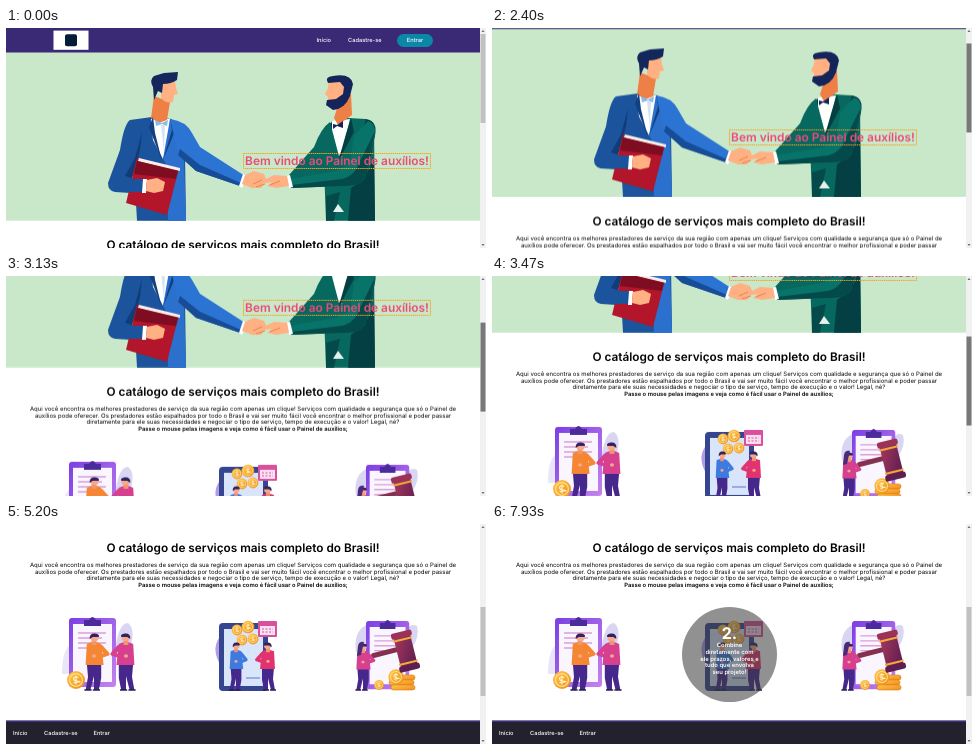
An HTML page for the animation above (8 s loop, 480x220 px).

```html
<!DOCTYPE html>
<html lang="pt-BR">
<head>
<meta charset="utf-8">
<title>Catálogo de serviços</title>
<style>
html, body { margin: 0; width: 100%; height: 100%; overflow: hidden; background: #fff; }
svg { display: block; width: 480px; height: 220px; }
text { font-family: Inter, "Open Sans", sans-serif; font-weight: 500; text-rendering: geometricPrecision; }
.mid text, text.mid { text-anchor: middle; }
.nav { font-size: 5.7px; fill: #fff; }
.h1 { font-size: 11.8px; font-weight: 600; }
.body text { font-size: 6px; font-weight: 400; }
.body .strong { font-size: 5.85px; font-weight: 600; }
.welcome { font-size: 11.9px; font-weight: 600; fill: #ee4a76; }
.tip { fill: #fff; font-size: 5.9px; opacity: 0; }
.tip text { font-weight: 600; }
.tip .num { font-size: 16px; font-weight: 700; }
.tip circle { fill: #3c3c3c; fill-opacity: .56; }

#page { animation: page 8s infinite; }
#thumb { animation: thumb 8s infinite, grab 8s step-end infinite; }
#tip1 { animation: tip1 8s linear infinite; }
#tip2 { animation: tip2 8s linear infinite; }

@keyframes page {
  0% { transform: translateY(0); }
  25.6% { transform: translateY(0); animation-timing-function: cubic-bezier(.3, 0, .7, .7); }
  35% { transform: translateY(-67.3px); animation-timing-function: linear; }
  43.375% { transform: translateY(-136px); animation-timing-function: cubic-bezier(.3, .3, .7, 1); }
  51.9%, 100% { transform: translateY(-193px); }
}
@keyframes thumb {
  0% { transform: translateY(0); }
  25.6% { transform: translateY(0); animation-timing-function: cubic-bezier(.3, 0, .7, .7); }
  35% { transform: translateY(27px); animation-timing-function: linear; }
  43.375% { transform: translateY(54.5px); animation-timing-function: cubic-bezier(.3, .3, .7, 1); }
  51.9%, 100% { transform: translateY(77px); }
}
@keyframes grab {
  0% { fill: #c1c1c1; }
  18.8% { fill: #a8a8a8; }
  24% { fill: #787878; }
  55% { fill: #a8a8a8; }
  58%, 100% { fill: #c1c1c1; }
}
@keyframes tip1 {
  0%, 74% { opacity: 0; }
  80%, 90.5% { opacity: 1; }
  95.5%, 100% { opacity: 0; }
}
@keyframes tip2 {
  0%, 93% { opacity: 0; }
  98%, 100% { opacity: 1; }
}
</style>
</head>
<body>
<svg viewBox="0 0 480 220" xmlns="http://www.w3.org/2000/svg">
<defs>
  <linearGradient id="violet" x1="0" y1="0" x2="1" y2="1">
    <stop offset="0" stop-color="#7b3fe4"/><stop offset="1" stop-color="#c583ee"/>
  </linearGradient>
  <linearGradient id="gold" x1="0" y1="0" x2="1" y2="1">
    <stop offset="0" stop-color="#ffc94a"/><stop offset="1" stop-color="#f08a1d"/>
  </linearGradient>
  <linearGradient id="wood" x1="0" y1="0" x2="1" y2="1">
    <stop offset="0" stop-color="#a8385c"/><stop offset="1" stop-color="#5a1c50"/>
  </linearGradient>
  <!-- feet at 0,0; shirt colour comes from "color" -->
  <g id="person">
    <path d="M-6-27H6L6-12 4 0H0L0-14-3 0H-7L-5-13Z" fill="#46288c"/>
    <path d="M-6-46Q0-50 6-46L8-25H-7Z" fill="currentColor"/>
    <path d="M5-44 11-36 1-32" fill="none" stroke="currentColor" stroke-width="4" stroke-linejoin="round"/>
    <circle cx="0" cy="-34" r="1.7" fill="#f7a98b"/>
    <path d="M-2-50H2V-45H-2Z" fill="#f2946f"/>
    <circle cx="0.5" cy="-52" r="3.3" fill="#f7a98b"/>
    <path d="M-3.6-51Q-4-57 1-56.5 5-56 4-53L-1-53Z" fill="#35215e"/>
    <path d="M-8 0H-2M-1 0H5" stroke="#2b1c50" stroke-width="1.6"/>
  </g>
  <g id="coin">
    <circle r="9" fill="url(#gold)"/>
    <circle r="6.4" fill="none" stroke="#ffe08a" stroke-width="1.2"/>
    <path d="M2.4-2.6Q-2.6-4-2.4-1.4T2.4 1.4-2.4 2.6M0-4.5V4.5" fill="none" stroke="#fff3c4" stroke-width="1.2"/>
  </g>
  <g id="board">
    <rect width="47" height="69" rx="3" fill="url(#violet)"/>
    <path d="M4 6H43V64H4Z" fill="#faf6ff"/>
    <path d="M15 2H20Q23.500-4 27 2H32V8H15Z" fill="#4b2a9c"/>
    <path d="M9 15H37M9 20H33M9 25H37M9 30H28" stroke="#dc9fd8" stroke-width="1.3"/>
  </g>
</defs>

<rect width="480" height="220" fill="#fff"/>
<g id="page">
  <!-- hero -->
  <rect y="24" width="474" height="168.700" fill="#c9e8c9"/>
  <g id="left-man">
    <path d="M124 92 146 89 165 91 176 97 179 125 180 192.700H131L128 140Z" fill="#1b549c"/>
    <path d="M145 91 164 91 163 110 157 131 147 112Z" fill="#fff"/>
    <path d="M155 97 159 97 158 124Z" fill="#d5e4f2"/>
    <path d="M148 68 164 74 161 92 153 95 145 90Z" fill="#ee7f45"/>
    <path d="M155 53 169 53 170 60 172 66 168 67 167 74Q160 76 155 70Z" fill="#ffb183"/>
    <path d="M148 72 147 59Q143 52 148 48L158 45 172 44 171 52Q165 56 157 56L156 65 152 63Z" fill="#14275c"/>
    <path d="M164 91 178 97 178 130 180 192.700H162L160 136 157 131Z" fill="#2c70cd"/>
    <path d="M147 89 143 99 156 133 149 105ZM164 90 166 102 157 132 169 103Z" fill="#123f80"/>
    <path d="M149 92 156 95 162 92 161 98 156 96 150 98Z" fill="#84bdea"/>
    <path d="M124 92Q118 96 114 122L102 155Q102 163 109 164L140 166 143 154 126 150 134 122Z" fill="#1b549c"/>
    <path d="M126 150 134 122 136 104 129 130 119 148Z" fill="#113c78"/>
    <path d="M131 130 173 140 161 187 120 175Z" fill="#b3152b"/>
    <path d="M133 130 174 140 174 143 132 133Z" fill="#f4f0ee"/>
    <path d="M131 133 172 143 170 151 128 146Z" fill="#7e0d22"/>
    <path d="M118 151 140 151 140 164 109 164Z" fill="#1b549c"/>
    <path d="M137 151 141 151 140 165 136 165Z" fill="#fff"/>
    <path d="M141 152 151 150 159 154 157 163 148 165 140 163Z" fill="#ffb183"/>
    <path d="M164 91Q180 93 186 105L194 119 239 148 234 158 190 143 172 125Z" fill="#2c74d3"/>
    <path d="M174 121 194 137 235 155 234 158 190 143 172 127Z" fill="#174c96"/>
    <path d="M237 146 241 148 236 160 233 158Z" fill="#fff"/>
  </g>
  <g id="right-man">
    <path d="M324 95 342 90 360 91 368 98 369 192.700H320L318 140Z" fill="#07685f"/>
    <path d="M326 93 344 91 337 120 331 132 325 112Z" fill="#fff"/>
    <path d="M333 74 345 66 346 87 332 97 328 90Z" fill="#ee7f45"/>
    <path d="M323 52 338 52 342 68 334 78 322 74 322 69 319 66 322 60Z" fill="#ffb183"/>
    <path d="M322 55Q318 49 327 48 345 45 347 56L344 68Q339 81 327 82L320 77 321 72 330 71 337 66 338 59 334 54Z" fill="#15255a"/>
    <path d="M345 90 348 104 332 134 340 106ZM326 93 322 106 331 134 326 110Z" fill="#033e42"/>
    <path d="M327 96 331 97 337 93 337 100 331 98 327 101Z" fill="#15255a"/>
    <path d="M360 91Q372 93 369 108L360 149 345 160 342 192.700H369L368 130 358 152 344 149Z" fill="#033f43"/>
    <path d="M324 94Q315 100 308 119L283 147 285 160 320 154 334 132Z" fill="#07685f"/>
    <path d="M348 108 362 93Q370 95 369 106L359 149Q356 158 338 158L285 160 284 151 330 143 344 136Z" fill="#087469"/>
    <path d="M369 103 359 149Q356 158 338 158L285 160 285 157 336 151Q349 148 354 133Z" fill="#044a4b"/>
    <path d="M320 168 334 164 328 192.700H320Z" fill="#044a4b"/>
    <path d="M332 176 338 184H327Z" fill="#e4f1ec"/>
    <path d="M281 148 284 147 287 159 283 160Z" fill="#fff"/>
  </g>
  <path d="M239 147 248 143 258 146 261 153 255 160 246 160 236 156Z" fill="#ffb183"/>
  <path d="M281 148 268 147 258 152 260 155 266 154 261 158 270 160 283 158Z" fill="#ffb183"/>
  <path d="M247 156 256 152M250 159 259 156M264 157 274 153" stroke="#e5793f" stroke-width=".8"/>
  <rect x="237.500" y="125.500" width="187" height="15" fill="none" stroke="#f5a31f" stroke-dasharray="1.400 .7"/>
  <text class="welcome mid" x="331" y="137.300">Bem vindo ao Painel de auxílios!</text>

  <!-- top bar -->
  <rect width="474" height="24.500" fill="#3a2a76"/>
  <rect x="47.500" y="2.600" width="35" height="19.200" fill="#fff"/>
  <rect x="59" y="6.200" width="12" height="12" rx="2" fill="#061d3a"/>
  <rect x="391" y="6" width="36" height="13" rx="6.500" fill="#0b88a8"/>
  <g class="nav">
    <text x="310.500" y="14.200">Início</text>
    <text x="342" y="14.200">Cadastre-se</text>
    <text class="mid" x="409" y="14.200">Entrar</text>
  </g>

  <g transform="translate(0 193)">
    <g class="mid" transform="translate(0 -.5)">
      <text class="h1" x="237" y="28.500">O catálogo de serviços mais completo do Brasil!</text>
      <g class="body">
        <text x="237" y="43.500">Aqui você encontra os melhores prestadores de serviço da sua região com apenas um clique! Serviços com qualidade e segurança que só o Painel de</text>
        <text x="237" y="50.200">auxílios pode oferecer. Os prestadores estão espalhados por todo o Brasil e vai ser muito fácil você encontrar o melhor profissional e poder passar</text>
        <text x="237" y="56.900">diretamente para ele suas necessidades e negociar o tipo de serviço, tempo de execução e o valor! Legal, né?</text>
        <text class="strong" x="237" y="63.600">Passe o mouse pelas imagens e veja como é fácil usar o Painel de auxílios;</text>
      </g>
    </g>

    <!-- step 1 -->
    <g>
      <path d="M109 128Q112 99 122 99 130 105 124 124Z" fill="#d9d6f4"/>
      <path d="M56 150Q56 128 63 122L68 150Z" fill="#e9e6fa"/>
      <use href="#board" x="63" y="94"/>
      <use href="#coin" x="70" y="156"/>
      <use href="#person" transform="translate(88 166) scale(1.2 1)" color="#f58634"/>
      <use href="#person" transform="translate(120 166) scale(-1.2 1)" color="#d6408f"/>
    </g>

    <!-- step 2 -->
    <g>
      <path d="M215 142Q205 126 213 114 221 124 219 142Z" fill="#b49be8"/>
      <rect x="213" y="99" width="49" height="68" rx="4" fill="#35458f"/>
      <path d="M218 105H257V162H218Z" fill="#d9e5fb"/>
      <rect x="252" y="97" width="19" height="16" rx="1" fill="#d9509c"/>
      <path d="M254 102H269V111H254Z" fill="#fbe1f1"/>
      <path d="M256 105H267M256 108H267" stroke="#d9509c" stroke-dasharray="2 1.500"/>
      <use href="#coin" transform="translate(231 106) scale(.6)"/>
      <use href="#coin" transform="translate(242 103) scale(.7)"/>
      <use href="#coin" transform="translate(236 116) scale(.6)"/>
      <use href="#coin" transform="translate(247 115) scale(.6)"/>
      <path d="M240 154H254" stroke="#5c74c8"/>
      <use href="#person" transform="translate(230 166) scale(.9 .84)" color="#3d7be0"/>
      <use href="#person" transform="translate(262 166) scale(-1 .84)" color="#e0336f"/>
    </g>

    <!-- step 3 -->
    <g>
      <path d="M350 128Q347 108 360 101L367 130ZM398 118Q401 97 411 102 414 112 406 124Z" fill="#d9d6f4"/>
      <use href="#board" transform="translate(360 97) scale(.92 .99)"/>
      <g fill="url(#gold)" stroke="#d97c16" stroke-width=".6">
        <rect x="385" y="151" width="24" height="5" rx="2.500"/>
        <rect x="383" y="156" width="25" height="5" rx="2.500"/>
        <rect x="385" y="161" width="24" height="5" rx="2.500"/>
      </g>
      <use href="#coin" transform="translate(390 153) scale(.85)"/>
      <use href="#coin" transform="translate(373 161) scale(.55)"/>
      <g transform="rotate(-14 400 127)">
        <rect x="365" y="121" width="30" height="5" rx="2.500" fill="#84304f"/>
        <rect x="391" y="111" width="17" height="32" fill="url(#wood)"/>
        <path d="M390 115H409M390 139H409" stroke="#f3ab3d" stroke-width="2"/>
        <rect x="389" y="107" width="21" height="6" rx="2" fill="#9b3358"/>
        <rect x="389" y="141" width="21" height="6" rx="2" fill="#5d1e50"/>
      </g>
      <use href="#person" transform="translate(357 166) scale(.95 .82)" color="#d6408f"/>
      <path d="M352 122Q353 117 358 118L355 131 351 132Z" fill="#4b2a7c"/>
    </g>

    <g id="tip1" class="tip mid">
      <circle cx="95" cy="130.500" r="47.500"/>
      <text class="num" x="95" y="115">1.</text>
      <text x="95" y="124.800">Encontre o</text>
      <text x="95" y="131.400">profissional que</text>
      <text x="95" y="138">você precisa em</text>
      <text x="95" y="144.700">nosso catálogo de</text>
      <text x="95" y="151.300">serviços e passe</text>
      <text x="95" y="157.900">para ele sua</text>
      <text x="95" y="164.500">necessidade!</text>
    </g>
    <g id="tip2" class="tip mid">
      <circle cx="237.500" cy="130.500" r="47.500"/>
      <text class="num" x="237.500" y="115">2.</text>
      <text x="237.500" y="123.300">Combine</text>
      <text x="237.500" y="129.900">diretamente com</text>
      <text x="237.500" y="136.500">ele prazos, valores e</text>
      <text x="237.500" y="143.200">tudo que envolva</text>
      <text x="237.500" y="149.800">seu projeto!</text>
    </g>

    <!-- footer -->
    <rect y="197" width="474" height="110" fill="#22212d"/>
    <rect y="196.300" width="474" height="1.400" fill="#4a3d94"/>
    <g class="nav">
      <text x="7" y="211">Início</text>
      <text x="38" y="211">Cadastre-se</text>
      <text x="87.500" y="211">Entrar</text>
    </g>
  </g>
</g>

<!-- scrollbar -->
<rect x="474" width="6" height="220" fill="#f1f1f1"/>
<path d="M475.500 4 477 2 478.500 4ZM475.500 216 477 218 478.500 216Z" fill="#6a6a6a"/>
<rect id="thumb" x="474.500" y="6" width="5" height="89" fill="#c1c1c1"/>
</svg>
</body>
</html>
```
